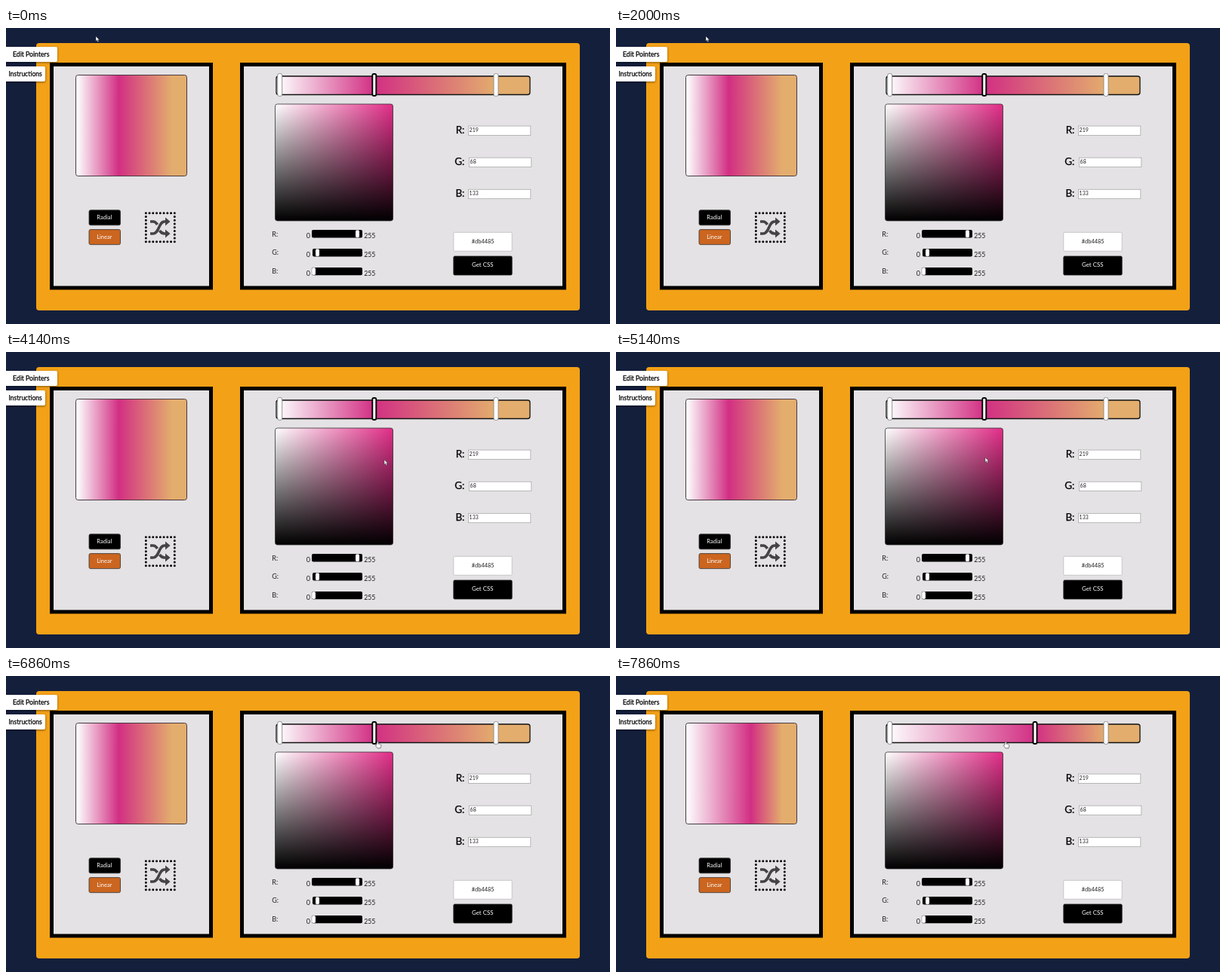
Animation, 800 px wide and 393 px high, one loop 8 s. Source, as an HTML page:

```html
<!DOCTYPE html>
<html lang="en">
<head>
<meta charset="utf-8">
<title>Gradient editor</title>
<style>
html, body { margin: 0; width: 100%; height: 100%; overflow: hidden; background: #141f3c; }
svg { display: block; width: 100%; height: 100%; font-family: Lato, "Open Sans", sans-serif; }
.medium { stroke: currentColor; stroke-width: .25; }
.shade { filter: drop-shadow(0 1px 1.5px #0007); }
</style>
</head>
<body>
<svg viewBox="0 0 800 393">
  <defs>
    <linearGradient id="blend">
      <stop offset=".015" stop-color="#fcfafc"/>
      <stop id="pinkStop" offset=".387" stop-color="#d22f83"/>
      <stop offset=".866" stop-color="#e3ad6d"/>
    </linearGradient>
    <linearGradient id="tint">
      <stop stop-color="#fff"/>
      <stop offset="1" stop-color="#e22d88"/>
    </linearGradient>
    <linearGradient id="dark" x2="0" y2="1">
      <stop stop-color="#000" stop-opacity="0"/>
      <stop offset="1" stop-color="#000"/>
    </linearGradient>
  </defs>

  <rect x="40" y="20" width="720" height="355" rx="4" fill="#f3a116"/>
  <g fill="#e4e2e4" stroke="#000" stroke-width="5">
    <rect x="60.5" y="48.5" width="211" height="296.5"/>
    <rect x="312.5" y="48.5" width="427" height="296.5"/>
  </g>

  <g class="shade" fill="#fff">
    <rect x="-4" y="25" width="72" height="20" rx="2"/>
    <rect x="-4" y="51" width="56" height="20" rx="2"/>
  </g>
  <g class="medium" font-size="8.7">
    <text x="9" y="38">Edit Pointers</text>
    <text x="3.5" y="63.5" font-size="8.5">Instructions</text>
  </g>

  <rect x="92.5" y="62.5" width="147" height="134" rx="3" fill="url(#blend)" stroke="#4a3a40"/>
  <g stroke="#333" stroke-width=".8">
    <rect x="110" y="241.8" width="41.5" height="20" rx="2"/>
    <rect x="110" y="267.6" width="41.5" height="20" rx="2" fill="#cb651f"/>
  </g>
  <g fill="#fff" font-size="7.5" text-anchor="middle">
    <text x="130.3" y="254">Radial</text>
    <text x="130.3" y="279.5">Linear</text>
  </g>

  <rect x="185.3" y="245.8" width="38" height="38" fill="none" stroke="#000" stroke-width="3" stroke-linecap="round" stroke-dasharray="0 4.75"/>
  <g fill="none" stroke="#444" stroke-width="3.6">
    <path d="M191 273h4c8 0 7-16 15-16h2M191 257h4q3 0 5.500 4M203.500 269q2.500 4 6.500 4h2"/>
    <path fill="#444" stroke="none" d="M211 251.500l6.500 5.500l-6.500 5.500zM211 267.500l6.500 5.500l-6.500 5.500z"/>
  </g>

  <rect x="358" y="64" width="336" height="24.500" rx="3" fill="url(#blend)" stroke="#111" stroke-width="1.300"/>
  <g fill="#fff" stroke="#888" stroke-width=".9">
    <rect x="359.700" y="60.500" width="6" height="30" rx="2.500"/>
    <rect x="646" y="60.500" width="6" height="30" rx="2.500"/>
    <rect id="handle" x="-2.500" y="61" width="5" height="29" rx="2" stroke="#000" stroke-width="1.900"/>
  </g>

  <g id="picker">
    <rect x="356.500" y="101" width="156" height="155" rx="3" fill="url(#tint)"/>
    <rect x="356.500" y="101" width="156" height="155" rx="3" fill="url(#dark)" stroke="#333" stroke-width=".8"/>
  </g>

  <g id="controls"></g>

  <g stroke-width=".8">
    <rect x="592.800" y="271.300" width="77.400" height="25" rx="1.500" fill="#fff" stroke="#bbb"/>
    <rect x="592.800" y="303" width="77.400" height="25" rx="1.500" stroke="#222"/>
  </g>
  <g text-anchor="middle">
    <text x="631.700" y="286" font-size="7.400" fill="#222">#db4485</text>
    <text x="631.300" y="317" font-size="7.900" fill="#fff">Get CSS</text>
  </g>

  <path id="arrow" d="M0 0v6.400l1.500-1.300l1.100 2.500l1.200-.5l-1.100-2.400h2z" fill="#fff" stroke="#333" stroke-width=".5"/>
  <path id="hand" d="M-1.500-3.500q1-1 1.600 0v2.700q3-.4 3.600 1q.5 2-.7 4.600h-4l-2.700-3.400q0-1.300 1.500-.6z" fill="#fff" stroke="#333" stroke-width=".6"/>
</svg>
<script>
const $ = id => document.getElementById(id);
const LOOP = 8000, FPS = 7;

// label, value, thumb x, track x, field x
const channels = [
  ["R", 219, 465.5, 405, 612],
  ["G", 68, 412.5, 406, 613],
  ["B", 133, 407.5, 405, 612],
];
$("controls").innerHTML = channels.map(([name, value, thumb, track, field], i) => {
  const y = 273.3 + i * 24.9, fy = 136.3 + i * 42.1;
  return `
    <text x="352.3" y="${y + 3.2}" font-size="9" fill="#222">${name}:</text>
    <text x="397.7" y="${y + 5.4}" font-size="9" fill="#222">0</text>
    <text x="474.2" y="${y + 5.4}" font-size="8.7" fill="#222">255</text>
    <rect x="${track}" y="${y - 5.2}" width="${472 - track}" height="10.4" rx="2"/>
    <rect x="${thumb - 2.5}" y="${y - 5}" width="5" height="10" rx="1.8" fill="#fff" stroke="#777" stroke-width=".5"/>
    <text class="medium" x="607.5" y="${fy + 3.8}" font-size="13.5" text-anchor="end">${name}:</text>
    <rect x="${field + .4}" y="${fy - 6.2}" width="82.4" height="12.4" fill="#fff" stroke="#aaa" stroke-width=".8"/>
    <text x="${field + 1.6}" y="${fy + 1.8}" font-size="7" fill="#222">${value}</text>`;
}).join("");

// time, x, y
const path = [
  [0, 119, 11], [2000, 119, 11], [2860, 426, 120], [3140, 426, 120],
  [4140, 501, 143], [4430, 501, 143], [5140, 489, 140], [5430, 489, 140],
  [6570, 493, 91], [7000, 493, 91], [7860, 517, 91], [LOOP, 517, 91],
];

const ramp = (t, a, b) => Math.min(1, Math.max(0, (t - a) / (b - a)));
const smooth = u => u * u * (3 - 2 * u);

function pointer(t) {
  const i = path.findIndex(p => p[0] > t);
  const [t0, x0, y0] = path[i - 1], [t1, x1, y1] = path[i];
  const u = t0 === 7000 ? ramp(t, t0, t1) : smooth(ramp(t, t0, t1));
  return [x0 + (x1 - x0) * u, y0 + (y1 - y0) * u];
}

function draw(t) {
  const [x, y] = pointer(t);
  const stop = 487.8 + 67.2 * ramp(t, 7000, 7857);
  const grabbing = t > 5430 && y < 94;
  $("handle").setAttribute("transform", `translate(${stop})`);
  $("pinkStop").setAttribute("offset", (stop - 358) / 336);
  for (const [id, shown] of [["arrow", !grabbing], ["hand", grabbing]]) {
    $(id).setAttribute("transform", `translate(${x} ${y})`);
    $(id).setAttribute("visibility", shown ? "visible" : "hidden");
  }
}

function tick(now) {
  const step = Math.floor((now % LOOP + 5) * FPS / 1000) % (LOOP / 1000 * FPS);
  draw(step * 1000 / FPS);
  requestAnimationFrame(tick);
}
requestAnimationFrame(tick);
</script>
</body>
</html>
```
